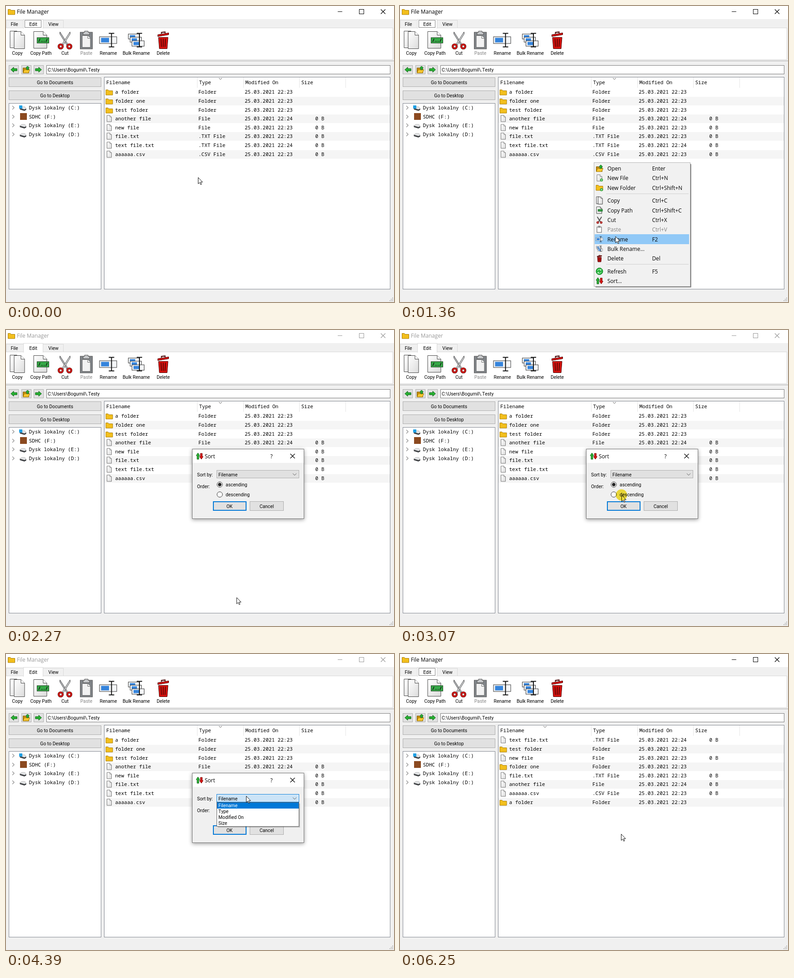
An HTML page for the animation above (7610 ms loop, 855x655 px).

```html
<!DOCTYPE html>
<html lang="en">
<head>
<meta charset="utf-8">
<title>File Manager</title>
<style>
html, body { margin: 0; width: 100%; height: 100%; overflow: hidden; background: #f0f0f0; }
svg { display: block; width: 855px; height: 655px; }
text { font: 10.35px Roboto, sans-serif; font-kerning: none; fill: #000; white-space: pre; }
.ui { font: 11.8px "Open Sans", sans-serif; }
.mono { font: 11px "Noto Sans Mono", monospace; }
.mid { text-anchor: middle; }
.off { fill: #838383; }
.light { fill: #fff; }
#title text { fill: currentColor; }
#halo { mix-blend-mode: multiply; }
#dialogBox { filter: drop-shadow(0 2px 4px #0006); }
</style>
</head>
<body>
<svg id="stage" viewBox="0 0 855 655"></svg>
<script>
const LOOP = 7610;
const LINE = '#adadad', BLUE = '#0078d7', GREEN = '#27b233', RED = '#d8130f';

// Drawing helpers; stroked boxes sit on whole pixels
const box = (x, y, w, h, fill, stroke) => stroke
  ? `<rect x="${x + .5}" y="${y + .5}" width="${w - 1}" height="${h - 1}" fill="${fill}" stroke="${stroke}"/>`
  : `<rect x="${x}" y="${y}" width="${w}" height="${h}" fill="${fill}"/>`;
const path = (d, fill = 'none', stroke = 'none', width) =>
  `<path d="${d}" fill="${fill}" stroke="${stroke}" ${width ? `stroke-width="${width}"` : 'vector-effect="non-scaling-stroke"'}/>`;
const disc = (x, y, r, fill, stroke = 'none', width = 1) =>
  `<circle cx="${x}" cy="${y}" r="${r}" fill="${fill}" stroke="${stroke}" stroke-width="${width}"/>`;
const text = (x, y, s, cls = '') => `<text x="${x}" y="${y}" class="${cls}">${s}</text>`;
const group = (id, body) => `<g id="${id}">${body}</g>`;
const place = (body, x, y, s = 1) => `<g transform="translate(${x} ${y}) scale(${s})">${body}</g>`;
const button = (x, y, w, h, label = '') =>
  box(x, y, w, h, '#e1e1e1', LINE) + text(x + w / 2, y + h / 2 + 4, label, 'mid');
const cross = (x, y) => path(`M${x} ${y}l10 10m0-10l-10 10`, 'none', 'currentColor', 1.1);
const chevron = (x, y, w, h) => path(`M${x} ${y}l${w / 2} ${h}l${w / 2} ${-h}`, 'none', '#555', 1);
const page = (x, y, w, h, f, stroke = '#444', fill = 'url(#paper)') =>
  path(`M${x} ${y}h${w - f}l${f} ${f}v${h - f}h${-w}z`, fill, stroke) +
  path(`M${x + w - f} ${y}v${f}h${f}`, '#fff', stroke);

// Icons, each centred on 0,0
const ibeam = (x, y, h) => path(`M${x - 6} ${y}h5l1 1l1-1h5M${x} ${y}v${h}M${x - 6} ${y + h}h5l1-1l1 1h5`, 'none', '#111', 2);
const field = (x, y, w, h) => box(x, y, w, h, '#f4f6f8', '#333') + box(x + 4, y + 3, w * .45, h - 6, '#3584dc');
const arrow = dir => path(`M${-9 * dir}-3H0V-7L${8 * dir} 0L0 7V3H${-9 * dir}z`, GREEN, '#17651d');
const ring = x => disc(x, 14, 4.4, 'none', '#3b0705', 4.4) + disc(x, 14, 4.4, 'none', RED, 3);
const folder = path('M-7.5-5.5h5l1.5 2h8.5v9.5h-15z', '#f2bf1d', '#a87c08');
const plus = disc(4.5, 4.5, 3.2, '#2aa236') + path('M2.5 4.5h4m-2-2v4', 'none', '#c8f0c8', 1);
const icons = {
  copy: page(-16, -20, 23, 37, 8) + page(-7, -19, 23, 38, 8),
  copyPath: page(-16, -19, 29, 37, 8) + box(-9, -6, 27, 13, '#36a947', '#173d1b') +
    path('M-5 4l3-7M11 4l3-7M0 3h1.5m2 0h1.5m2 0h1.5', 'none', '#111', 1.5),
  cut: path('M-11-18L7 10l-3 1L-9-10q-4-4-2-8z', '#c9ccd0', '#333') +
    path('M11-18L-7 10l3 1L9-10q4-4 2-8z', '#e7e9eb', '#333') + ring(-9.5) + ring(9.5),
  paste: box(-14, -18, 28, 38, '#808488', '#555') + page(-9, -10, 18, 26, 6, '#666', '#f2f2f2') +
    path('M-7-12v-5h3v-3h8v3h3v5z', '#c4c6c8', '#555'),
  pasteSmall: box(-6, -6, 11, 13, '#fff', '#555') + box(-3, -8, 5, 4, '#888'),
  rename: field(-20, -8, 39, 16) + ibeam(7, -15, 30),
  bulk: field(-18, -14, 26, 12) + field(-14, -7, 26, 12) + field(-10, 1, 28, 13) + ibeam(7, -15, 30),
  trash: path('M-10.5-6h21l-2 25h-17z', RED, '#400') + path('M-5-3l1 18M0-3v18M5-3l-1 18', 'none', '#5d0806', 2) +
    path('M-12-12l24-4v4l-24 4z', RED, '#400') + path('M-4-14v-3l8-1v3', 'none', '#400', 2),
  open: path('M-7 7v-11h5l2 2h6v9z', '#c48d0b', '#7c5a05') + path('M-7 7l3-7h12l-3 7z', '#f6c62d', '#a87c08') +
    path('M1 0v-4h-2l4-4l4 4h-2v4z', GREEN, '#17651d'),
  newFile: page(-5.5, -7, 11, 14, 4, '#777') + plus,
  newFolder: folder + plus,
  refresh: disc(0, 0, 7.5, '#22b33a', '#137a24') +
    path('M-4-1a4 4 0 0 1 7-2M4 1a4 4 0 0 1-7 2M3.5-5v3h-3M-3.5 5v-3h3', 'none', '#d2f5d4', 1.2),
  sort: path('M-5.5 7v-8h-2l4-6l4 6h-2v8z', GREEN, '#17651d') + path('M2-6v7h-2l4 6l4-6h-2v-7z', RED, '#7a0c0a'),
};

// Main window
const toolbar = [['copy', 25, 'Copy'], ['copyPath', 77, 'Copy Path'], ['cut', 130, 'Cut'], ['paste', 177, 'Paste'],
  ['rename', 225.5, 'Rename'], ['bulk', 287, 'Bulk Rename'], ['trash', 346.5, 'Delete']];
const drive = path('M-7 0l4-3h7l3 4l-3 2z', '#e3e5e7', '#bbb') + path('M-7 0l10 3l4-2v3l-4 2l-10-3z', '#3c3f42');
const tree = ['Dysk lokalny (C:)', 'SDHC (F:)', 'Dysk lokalny (E:)', 'Dysk lokalny (D:)'].map((name, i) => {
  const y = Math.round(225 + 19.6 * i);
  const icon = i === 1 ? box(31, y - 8, 15, 15, '#8b4a20')
    : place(drive, 37.5, y + 1) + (i ? '' : box(29, y - 5, 7, 7, '#20a0e4'));
  return path(`M14 ${y - 4}l4 4l-4 4`, 'none', '#888', 1.2) + icon + text(50.5, y + 4, name, 'mono');
}).join('');

const files = [['a folder', 'Folder'], ['folder one', 'Folder'], ['test folder', 'Folder'], ['another file', 'File', 24],
  ['new file', 'File'], ['file.txt', '.TXT File'], ['text file.txt', '.TXT File', 24], ['aaaaaa.csv', '.CSV File']];
const table = list => list.map(([name, type, min = 23], i) => {
  const y = Math.round(190.2 + 19.65 * i), isFolder = type === 'Folder';
  return (i % 2 ? box(217, y - 9, 629, 19, '#f5f5f5') : '') +
    (isFolder ? place(folder, 227.5, y + 1) : page(222.5, y - 7, 10, 14, 3.5, '#777')) +
    text(240.5, y + 4, name, 'mono') + text(424, y + 4, type, 'mono') +
    text(526, y + 4, '25.03.2021 22:' + min, 'mono') + (isFolder ? '' : text(681.5, y + 4, '0 B', 'mono'));
}).join('');
const byName = [...files].sort((a, b) => a[0] < b[0] ? 1 : -1);

const frame =
  box(0, 0, 855, 29, '#fff') + place(folder, 12, 13) +
  group('title', text(24, 17, 'File Manager', 'ui') + path('M731 12.5h10', 'none', 'currentColor', 1) +
    box(778, 7, 11, 11, 'none', 'currentColor') + cross(826, 7.5)) +
  box(0, 31, 39, 18, '#f0f0f0', '#d9d9d9') + box(81, 31, 46, 18, '#f0f0f0', '#d9d9d9') +
  box(-1, 48, 854, 71, '#fff', '#d9d9d9') + box(38, 29, 44, 21, '#fff', '#d9d9d9') + box(39, 47, 42, 4, '#fff') +
  text(18.5, 44, 'File', 'mid') + text(60, 43.5, 'Edit', 'mid') + text(104.5, 44, 'View', 'mid') +
  '<rect id="focus" x="41.5" y="31.5" width="36" height="16" fill="none" stroke="#000" stroke-dasharray="1 1"/>' +
  toolbar.map(([icon, x, label], i) => place(icons[icon], x, 75.5) +
    text(x, 108, label, i === 3 ? 'mid off' : 'mid')).join('') +
  box(0, 121, 855, 1, '#a7a7a7') +
  button(6, 131, 22, 20) + button(34, 131, 22, 20) + button(61, 131, 22, 20) +
  place(arrow(-1), 17, 141, .8) + place(icons.open, 44.5, 141) + place(arrow(1), 72, 141, .8) +
  box(89, 131, 758, 20, '#fff', '#7a7a7a') + text(92, 145, 'C:\\Users\\Bogumil\\.Testy') +
  button(6, 158, 204, 21, 'Go to Documents') + button(6, 187, 204, 21, 'Go to Desktop') +
  box(6, 215, 204, 412, '#fff', '#828790') + tree +
  box(216, 157, 631, 470, '#fff', '#828790') +
  [421, 523, 646, 748].map(x => box(x, 158, 1, 23, '#e5e5e5')).join('') +
  [['Filename', 221], ['Type', 425.5], ['Modified On', 527.5], ['Size', 650.5]].map(([s, x]) => text(x, 173, s, 'mono')).join('') +
  group('byType', chevron(469, 159.5, 7, 3) + table(files)) +
  group('byName', chevron(316, 159.5, 7, 3) + table(byName)) +
  [[0, 2], [1, 1], [1, 2], [2, 0], [2, 1], [2, 2]].map(([c, r]) => box(845 + 3 * c, 645 + 3 * r, 2, 2, '#bcbcbc')).join('');

// Context menu
const entries = [
  [359.5, 'open', 'Open', 'Enter'], [380.5, 'newFile', 'New File', 'Ctrl+N'], [402, 'newFolder', 'New Folder', 'Ctrl+Shift+N'],
  [430.5, 'copy', 'Copy', 'Ctrl+C', .42], [452, 'copyPath', 'Copy Path', 'Ctrl+Shift+C', .4], [473.5, 'cut', 'Cut', 'Ctrl+X', .4],
  [494.5, 'pasteSmall', 'Paste', 'Ctrl+V'], [516, 'rename', 'Rename', 'F2', .4], [537, 'bulk', 'Bulk Rename...', '', .4],
  [558.5, 'trash', 'Delete', 'Del', .4], [587, 'refresh', 'Refresh', 'F5'], [608, 'sort', 'Sort...', '']];
const menu = box(431, 350, 211, 273, '#0005') + box(430, 349, 211, 273, '#0005') +
  box(427, 346, 213, 275, '#f1f1f1', '#b4b4b4') +
  '<rect id="hover" x="429" width="208" height="22" fill="#91c9f7"/>' +
  box(454, 415, 182, 1, '#cfcfcf') + box(454, 571, 182, 1, '#cfcfcf') +
  entries.map(([y, icon, label, keys, s = 1]) => {
    const cls = label === 'Paste' ? 'ui off' : 'ui';
    return place(icons[icon], 439.5, y, s) + text(457, y + 4.5, label, cls) + text(555.5, y + 4.5, keys, cls);
  }).join('');

// Sort dialog
const radio = (y, id, label) => disc(471, y, 6, '#fff', '#333') +
  `<circle id="${id}" cx="471" cy="${y}" r="3.8" fill="#222"/>` + text(484, y + 4, label);
const dialog = group('dialogBox', box(410, 263, 247, 155, '#f0f0f0', '#777')) + box(411, 264, 245, 30, '#fff') +
  place(icons.sort, 426.5, 279) + text(438, 283.5, 'Sort', 'ui') + text(585, 283.5, '?', 'ui mid') + cross(626.5, 274) +
  text(421, 323.5, 'Sort by:') + text(421, 349.5, 'Order:') +
  box(464, 310, 182, 18, '#e1e1e1', LINE) +
  group('comboHover', box(464, 310, 182, 18, '#e5f1fb', BLUE)) +
  group('comboPress', box(467, 312, 176, 14, '#cce4f7')) +
  text(468, 323.5, 'Filename') + chevron(632, 317.5, 8, 4) +
  radio(342, 'asc', 'ascending') + radio(364, 'desc', 'descending') +
  button(456, 379, 74, 21) + group('okHover', box(456, 379, 74, 21, '#e5f1fb')) +
  `<rect x="457" y="380" width="72" height="19" fill="none" stroke="${BLUE}" stroke-width="2"/>` +
  text(492.5, 393.5, 'OK', 'mid') + button(537, 379, 75, 21, 'Cancel');
const popup = box(467, 331, 181, 53, '#0003') + box(464, 328, 182, 54, '#fff', '#646464') + box(465, 329, 180, 13, BLUE) +
  ['Filename', 'Type', 'Modified On', 'Size'].map((s, i) => text(468, 339 + 13 * i, s, i ? '' : 'light')).join('');

const stage = document.getElementById('stage');
stage.innerHTML = '<defs><linearGradient id="paper" x2="1" y2="1"><stop stop-color="#fff"/><stop offset="1" stop-color="#dcdcdc"/></linearGradient></defs>' +
  frame + group('menu', menu) + group('dialog', dialog) + group('popup', popup) +
  group('cursor', path('M.5 .5v14l3.2-3l2.3 4.8l2-1l-2.2-4.6h4.4z', '#fff', '#111', 1)) +
  group('halo', disc(0, 0, 12.5, '#f7e43c'));

const el = {};
stage.querySelectorAll('[id]').forEach(e => el[e.id] = e);

// Pointer stops: time, x, y
const stops = [[50, 423, 379], [640, 427, 346], [1040, 427, 346], [1590, 503, 608], [2190, 503, 608], [2280, 508, 591],
  [2430, 523, 483], [2920, 488, 365], [3230, 488, 365], [3600, 529, 314], [5330, 529, 314], [5440, 442, 302],
  [5470, 442, 302], [5760, 487, 398]];
const clicks = [[690, 920], [1960, 2100], [2960, 3140], [3630, 3850], [4940, 5120], [5800, 5970]];

const ramp = (t, a, b) => Math.min(1, Math.max(0, (t - a) / (b - a)));
const within = (t, a, b) => t >= a && t < b;
const show = (e, on) => e.setAttribute('opacity', +on);

function pointer(t) {
  const n = stops.findIndex(s => s[0] > t);
  if (n === 0) return stops[0].slice(1);
  if (n < 0) return stops[stops.length - 1].slice(1);
  const [t0, x0, y0] = stops[n - 1], [t1, x1, y1] = stops[n];
  const u = ramp(t, t0, t1), k = u * u * (3 - 2 * u);
  return [x0 + (x1 - x0) * k, y0 + (y1 - y0) * k];
}

function draw(now) {
  const t = now % LOOP, [x, y] = pointer(t);
  const sorted = t >= 6010, active = t < 2150 || sorted, descending = t >= 3080;

  el.title.style.color = active ? '#000' : '#999';
  show(el.focus, active);
  show(el.byType, !sorted);
  show(el.byName, sorted);

  show(el.menu, within(t, 880, 2100));
  const row = x > 428 && entries.find(e => Math.abs(e[0] - y) < 10.7);
  show(el.hover, !!row);
  if (row) el.hover.setAttribute('y', Math.floor(row[0] - 10.5));

  show(el.dialog, ramp(t, 2140, 2230) * (1 - ramp(t, 6030, 6240)));
  show(el.comboHover, ramp(t, 3440, 3600) * (1 - ramp(t, 5470, 5700)));
  show(el.comboPress, ramp(t, 4020, 4390) * (1 - ramp(t, 4950, 5140)));
  show(el.asc, !descending);
  show(el.desc, descending);
  show(el.okHover, ramp(t, 5680, 5780));
  show(el.popup, ramp(t, 3820, 3960) * (t < 5060));

  const spot = `translate(${x} ${y})`;
  el.cursor.setAttribute('transform', spot);
  el.halo.setAttribute('transform', spot);
  show(el.halo, clicks.some(([a, b]) => within(t, a, b)));
  requestAnimationFrame(draw);
}
requestAnimationFrame(draw);
</script>
</body>
</html>
```
